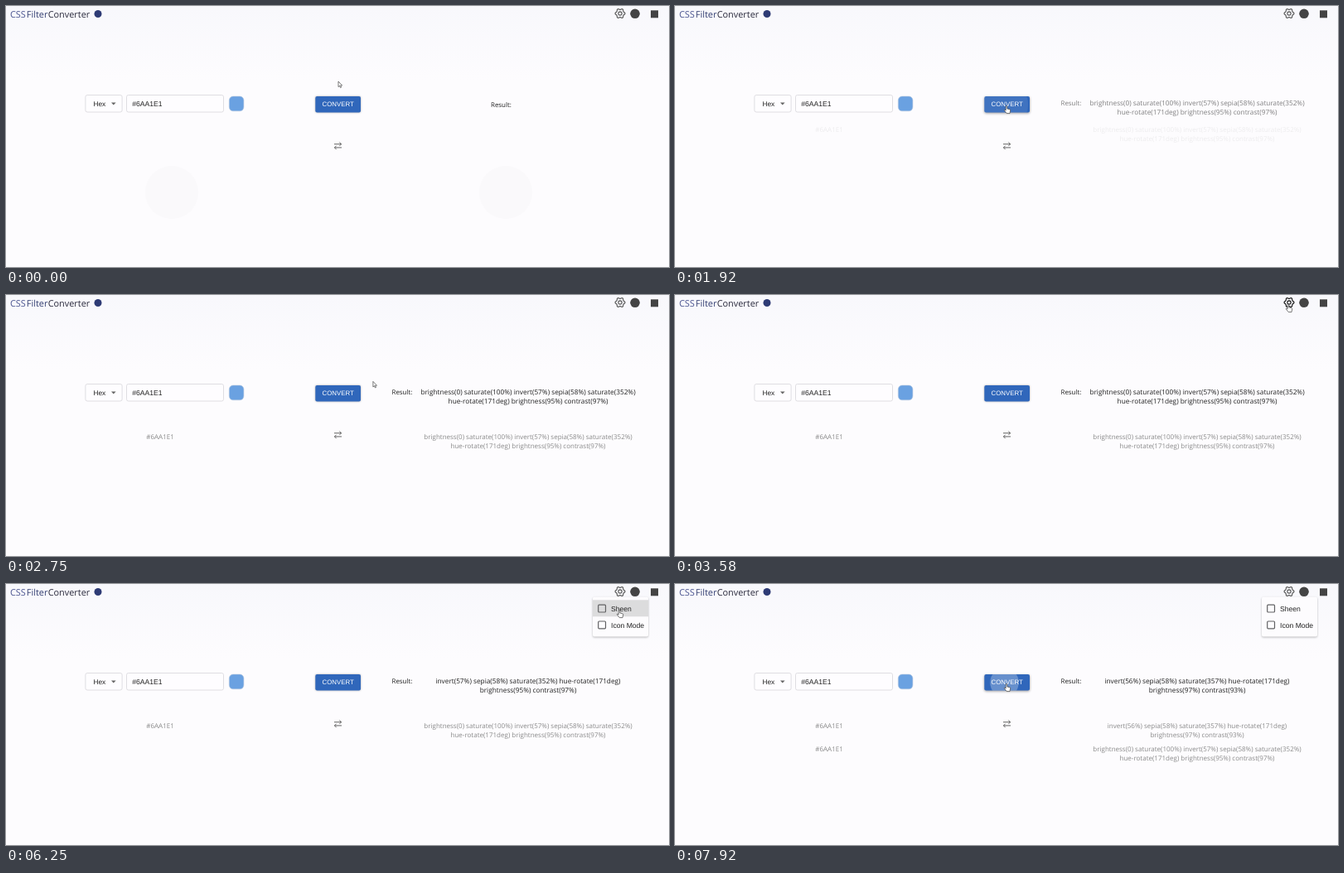
An HTML page that plays this animation: 800 px wide and 315 px high, repeating every 8 s.

```html
<!DOCTYPE html>
<html lang="en">
<head>
<meta charset="utf-8">
<title>CSS filter converter</title>
<style>
  html, body { margin: 0; width: 100%; height: 100%; overflow: hidden; background: #fdfcfe; }
  svg { display: block; width: 800px; height: 315px; background: linear-gradient(#f8f8fc, #fdfcfe 90px); }
  text { font: 8.28px "Open Sans", "Noto Sans", sans-serif; fill: #222; text-rendering: geometricPrecision; white-space: pre; }
  .ui { font: 8.6px "Liberation Sans", Arial, sans-serif; }
  .mid { text-anchor: middle; }
  .history text { font-size: 8.03px; fill: #8a8a8a; }
  .field { fill: #fefdff; stroke: #dfdee2; }
  .box { fill: none; stroke: #626264; stroke-width: 1.2; }
  .pointer { fill: #fff; stroke: #444; stroke-width: .7; stroke-linejoin: round; }
  #button { fill: #3067bb; }
  #menu > .paper { fill: #fdfcfe; filter: drop-shadow(0 1px .8px #0004); }
</style>
</head>
<body>
<svg viewBox="0 0 800 315">
  <defs><clipPath id="clip"><rect x="373.3" y="109" width="54.7" height="19.5" rx="2"/></clipPath></defs>

  <text x="5" y="13.9" style="font-size:10.9px"><tspan fill="#4a5490">CSS</tspan><tspan dx="1" fill="#343f72">Filter</tspan><tspan dx=".3" fill="#2a2a3c">Converter</tspan></text>
  <circle cx="111" cy="9.5" r="4.5" fill="#2e3b75"/>
  <g id="gear" fill="none" stroke-width="1.1" stroke-linejoin="round">
    <path id="teeth"/><circle cx="741" cy="9" r="2.1"/>
  </g>
  <circle cx="759" cy="9.3" r="5.8" fill="#444"/>
  <rect x="778" y="5.3" width="9" height="9" fill="#444"/>

  <g id="marks" fill="#faf9fb">
    <circle cx="200" cy="225" r="32"/><circle cx="603" cy="225" r="32"/>
  </g>

  <rect class="field" x="95.9" y="107.5" width="44.2" height="20.5" rx="2.2"/>
  <text class="ui" x="105.4" y="120.8" style="font-size:8.3px">Hex</text>
  <path d="M127 116.6h5.6l-2.8 2.8z" fill="#666"/>
  <rect class="field" x="145.5" y="107.5" width="117" height="20.5" rx="2.2"/>
  <text class="ui" x="152.3" y="120.8">#6AA1E1</text>
  <rect x="269.3" y="109" width="17.6" height="17.8" rx="4.8" fill="#6aa1e1" stroke="#b4c6dd" stroke-width=".6"/>

  <rect id="button" x="373.3" y="109" width="54.7" height="19.5" rx="2"/>
  <g clip-path="url(#clip)"><circle id="ripple" cx="397.5" cy="119" fill="#fff"/></g>
  <text class="ui" x="381.6" y="121.3" style="font-size:7.85px;fill:#fff">CONVERT</text>

  <path d="M396 166.7h8.6m-2.2-2.2 2.2 2.2-2.2 2.2M405 170.9h-8.6m2.2-2.2-2.2 2.2 2.2 2.2" fill="none" stroke="#555" stroke-width=".9"/>

  <g id="result">
    <text id="label" style="font-size:7.9px">Result:</text>
    <text id="line1" class="mid" x="630" y="119.7"></text>
    <text id="line2" class="mid" x="630" y="130.8"></text>
  </g>
  <g id="newer" class="history"></g>
  <g id="older" class="history"></g>

  <g id="menu">
    <rect class="paper" x="708" y="15.5" width="67" height="48" rx="2"/>
    <rect id="row" x="708" y="19.3" width="67" height="20"/>
    <rect class="box" x="714.7" y="25.2" width="8.8" height="8.8" rx="1"/>
    <g id="check">
      <rect x="714" y="24.5" width="10.2" height="10.2" rx="1.2" fill="#1f70d0"/>
      <path d="M716 29.8l2.2 2.2 4.2-4.4" fill="none" stroke="#fff" stroke-width="1.2"/>
    </g>
    <text class="ui" x="730" y="32.6">Sheen</text>
    <rect class="box" x="714.7" y="45" width="8.8" height="8.8" rx="1"/>
    <text class="ui" x="730" y="52.5">Icon Mode</text>
  </g>

  <path id="arrow" class="pointer" d="M0 0v6.6l1.5-1.3 1 2.3 1.1-.5-1-2.2h2z"/>
  <path id="hand" class="pointer" d="M-.8.8Q0-.3.8.8V4l3 .7q1 .3.9 1.3L4 9.6H.2L-2.6 6q-.4-1 .6-.9L-.8 6z"/>
</svg>
<script>
const $ = id => document.getElementById(id);
const set = (id, attrs) => { for (const k in attrs) $(id).setAttribute(k, attrs[k]); };
const show = (id, on) => { $(id).style.display = on ? '' : 'none'; };
const ramp = (t, start, length) => Math.min(1, Math.max(0, (t - start) / length));

const LOOP = 8000, RESULT = 1580, HISTORY = 1840, OPEN = 3950, UNCHECK = 6080, UPDATE = 7740;
const CLICKS = [1440, 7720];
const PREFIX = 'brightness(0) saturate(100%) ';
const FIRST = ['invert(57%) sepia(58%) saturate(352%)', 'hue-rotate(171deg)', 'brightness(95%) contrast(97%)'];
const SECOND = ['invert(56%) sepia(58%) saturate(357%)', 'hue-rotate(171deg)', 'brightness(97%) contrast(93%)'];

// With the prefix the rotation wraps onto the second line.
const wrap = ([head, hue, tail], prefix) =>
  prefix ? [PREFIX + head, hue + ' ' + tail] : [head + ' ' + hue, tail];

// Pointer path: time, x, y
const PATH = [
  [0, 401, 91], [500, 401, 91], [830, 400, 120], [2680, 400, 120], [2920, 545, 67],
  [3150, 680, 29], [3420, 740, 11], [4290, 740, 11], [4580, 740, 31], [6420, 740, 31],
  [6750, 581, 52], [7080, 470, 91], [7450, 400, 120], [LOOP, 400, 120]
];

function pointerAt(t) {
  const i = PATH.findIndex(p => p[0] > t);
  const [a, b] = [PATH[i - 1], PATH[i]];
  const k = ramp(t, a[0], b[0] - a[0]);
  return [a[1] + (b[1] - a[1]) * k, a[2] + (b[2] - a[2]) * k];
}

function fillHistory(id, lines) {
  $(id).innerHTML = `<text class="mid" x="186" y="174">#6AA1E1</text>` +
    lines.map((s, i) => `<text class="mid" x="630" y="${174 + i * 11.4}">${s}</text>`).join('');
}

// Six teeth, each four points wide: two outer, two inner.
function gearPath() {
  const points = [];
  for (let i = 0; i < 24; i++) {
    const a = (i - .5) * Math.PI / 12, r = i % 4 < 2 ? 5.9 : 4.7;
    points.push((741 + r * Math.cos(a)).toFixed(2) + ' ' + (9 + r * Math.sin(a)).toFixed(2));
  }
  return 'M' + points.join('L') + 'z';
}

fillHistory('older', wrap(FIRST, true));
fillHistory('newer', wrap(SECOND, false));
set('teeth', { d: gearPath() });

function draw(t) {
  const [x, y] = pointerAt(t);
  const open = t >= OPEN;
  const onButton = x > 373 && x < 428 && y > 109 && y < 129;
  const onGear = x > 734 && y < 17;
  const onRow = open && x > 708 && y > 19 && y < 40;
  const hand = onButton || onGear || onRow;

  show('arrow', !hand);
  show('hand', hand);
  set(hand ? 'hand' : 'arrow', { transform: `translate(${x} ${y})` });
  set('gear', { stroke: onGear && !open ? '#111' : '#555' });

  $('button').style.filter = onButton
    ? 'drop-shadow(0 1.2px 1.6px #0006)' : 'drop-shadow(0 .8px 1px #0005)';
  const since = t - (t < CLICKS[1] ? CLICKS[0] : CLICKS[1]);
  const grow = ramp(since, 0, 550);
  set('ripple', {
    r: 29 * (1 - (1 - grow) ** 2),
    opacity: since < 0 ? 0 : .3 * (1 - ramp(since, 150, 450))
  });

  const ready = t >= RESULT, sheen = t < UNCHECK;
  const lines = wrap(t < UPDATE ? FIRST : SECOND, sheen);
  set('label', ready ? { x: 465.5, y: 119.5 } : { x: 585, y: 122 });
  set('result', { opacity: ready ? ramp(t, RESULT, 600) : 1 });
  $('line1').innerHTML = !ready ? '' : onRow && sheen
    ? lines[0].replace(PREFIX, `<tspan fill="#2a20d8">${PREFIX}</tspan>`) : lines[0];
  $('line2').textContent = ready ? lines[1] : '';
  set('marks', { opacity: 1 - ramp(t, RESULT, 250) });

  const slide = ramp(t, HISTORY, 590);
  set('older', { opacity: slide, transform: `translate(0 ${t < UPDATE ? 26 * (slide - 1) : 28})` });
  show('newer', t >= UPDATE);

  const p = ramp(t, OPEN, 200);
  set('menu', {
    opacity: p,
    transform: `translate(741 15) scale(${.75 + .25 * p} ${.56 + .44 * p}) translate(-741 -15)`
  });
  show('check', sheen);
  set('row', { opacity: !onRow ? 0 : sheen ? .04 : .04 + .09 * ramp(t, UNCHECK, 100) });
}

const begin = performance.now();
function tick() {
  draw((performance.now() - begin) % LOOP);
  requestAnimationFrame(tick);
}
tick();
</script>
</body>
</html>
```
